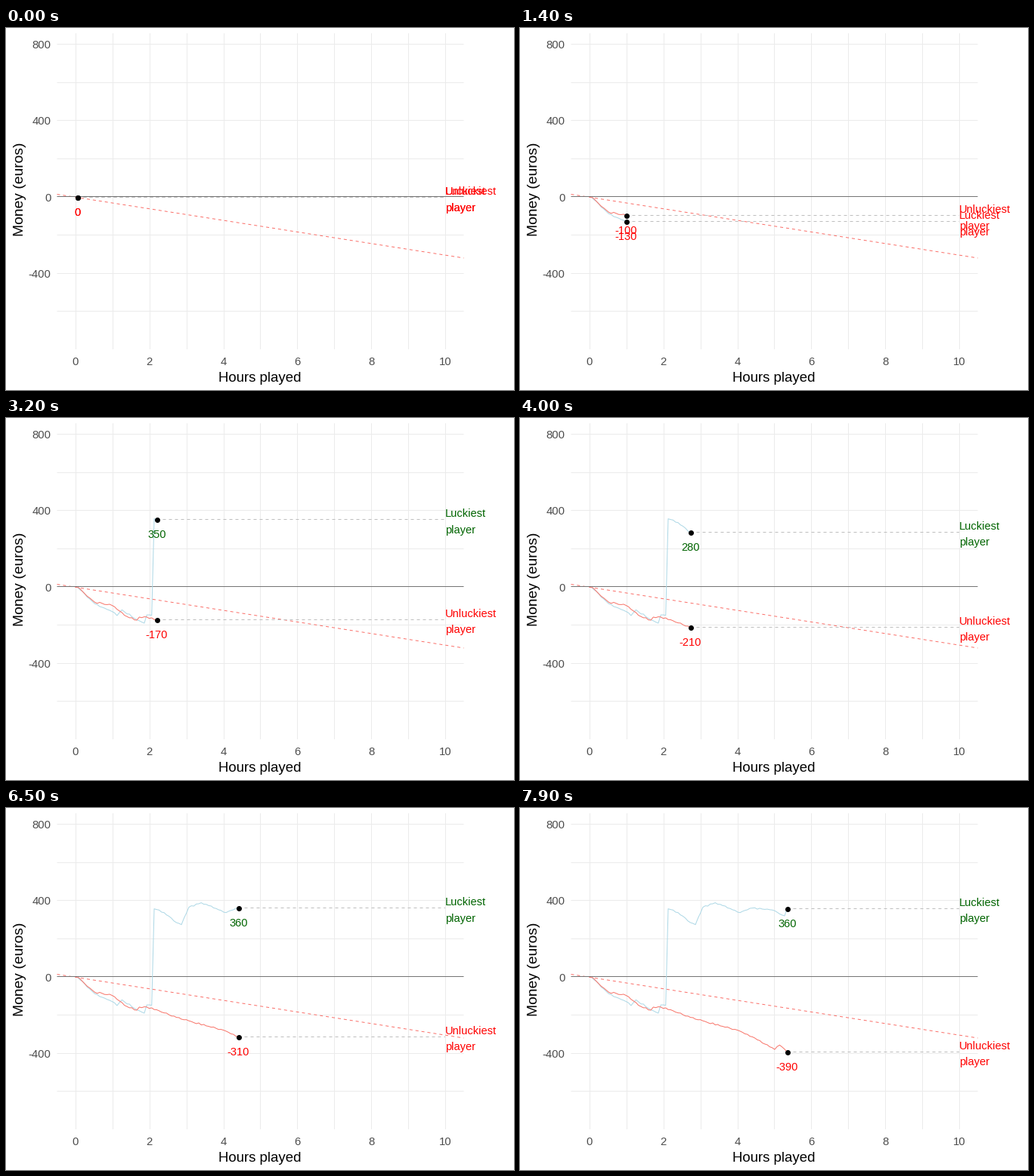
These frames come from a looping animation (672x480 px, 8000 ms). A matplotlib script:

```python
import numpy as np
import matplotlib.pyplot as plt
from matplotlib.animation import FuncAnimation

W, H, DPI = 672, 480, 96
PX = 72 / DPI                        # points per pixel
FRAMES, INTERVAL = 80, 100
LEFT, RIGHT, TOP, BOTTOM = 67.5, 605.5, 7, 426

plt.rcParams["font.family"] = "Liberation Sans"

STEPS = np.arange(FRAMES)
HOURS = 0.05 + 0.067 * STEPS

# (step, euros): the turns of each balance; small wins and losses are random
LUCKY = [(0, 0), (7, -88), (14, -129), (16, -150), (18, -120), (24, -172),
         (27, -190), (28, -147), (30, -149), (31, 357), (35, 337),
         (40, 284.7), (42, 274), (45, 365), (50, 389), (53, 374), (60, 337),
         (65, 361), (74, 347), (78, 320), (79, 358)]
UNLUCKY = [(0, 0), (7, -80), (14, -97), (20, -155), (24, -174), (25, -158),
           (30, -162), (40, -212), (53, -259), (60, -284), (65, -314),
           (74, -380), (76, -357), (79, -393)]


def balance(turns, seed):
    at, euros = zip(*turns)
    noise = np.random.default_rng(seed).uniform(-4, 4, FRAMES)
    noise[list(at)] = 0
    return np.interp(STEPS, at, euros) + noise


def px(hours):
    return 92 + 48.9 * hours


def py(euros):
    return 224 - 0.253 * euros


def mid(v):
    """Centre of the pixel that holds v."""
    return np.floor(v) + 0.5


fig = plt.figure(figsize=(W / DPI, H / DPI), dpi=DPI, facecolor="white")
ax = fig.add_axes([0, 0, 1, 1])
ax.set_xlim(0, W)
ax.set_ylim(H, 0)
ax.axis("off")


def line(xs, ys, color, z, dashed=False):
    style = (0, (4, 4)) if dashed else "-"
    return ax.plot(xs, ys, color=color, lw=PX, ls=style, zorder=z,
                   snap=False, dash_capstyle="butt",
                   solid_capstyle="butt")[0]


def label(x, y, s, size, color, ha="left", **kw):
    return ax.text(x, y, s, fontsize=size * PX, color=color, ha=ha,
                   va="baseline", zorder=8, **kw)


for hour in range(11):
    x = round(px(hour)) + 0.5
    line([x, x], [TOP, BOTTOM], "#ebebeb", 1)
    if hour % 2 == 0:
        label(px(hour), 447, str(hour), 14.93, "#4d4d4d", "center")
for euros in range(-600, 801, 200):
    y = round(py(euros) - 0.4) + 0.5
    if euros:
        line([LEFT, RIGHT], [y, y], "#ebebeb", 1)
    if euros % 400 == 0:
        label(59.5, py(euros) + 5.5, str(euros), 14.93, "#4d4d4d", "right")
label(335.5, 469, "Hours played", 18.67, "black", "center")
label(23, 213.5, "Money (euros)", 19.3, "black", "center",
      rotation=90, rotation_mode="anchor")

line([LEFT, RIGHT], [220.5, 305], "#fb6f69", 2, dashed=True)
line([LEFT, RIGHT], [223.5, 223.5], "#737373", 3)


class Player:
    def __init__(self, name, euros, color, z):
        self.euros = euros
        self.path = line([], [], color, z)
        self.guide = line([], [], "#bebebe", 6, dashed=True)
        self.dot = ax.plot([], [], "o", color="black", ms=7 * PX, mew=0,
                           zorder=7)[0]
        self.value = label(0, 0, "", 14.67, "red", "center")
        self.name = [label(px(10), 0, s, 14.67, "red")
                     for s in (name, "player")]

    def show(self, i):
        v = self.euros[i]
        x, y = mid(px(HOURS[i])), mid(py(v))
        self.path.set_data(px(HOURS[:i + 1]), py(self.euros[:i + 1]))
        self.guide.set_data([x, px(10)], [y, y])
        self.dot.set_data([x], [y])
        self.value.set_text(str(int(round(float(v), -1))))
        self.value.set_position((x, y + 24.5))
        for text, dy in zip(self.name, (-3.5, 18)):
            text.set_y(y + dy)
        for text in [self.value, *self.name]:
            text.set_color("darkgreen" if v > 0 else "red")


players = [Player("Luckiest", balance(LUCKY, 3), "lightblue", 4),
           Player("Unluckiest", balance(UNLUCKY, 5), "#f8756a", 5)]


def update(i):
    for p in players:
        p.show(i)
    return []


anim = FuncAnimation(fig, update, frames=FRAMES, interval=INTERVAL,
                     repeat=True, repeat_delay=0, blit=False)
plt.show()
```
